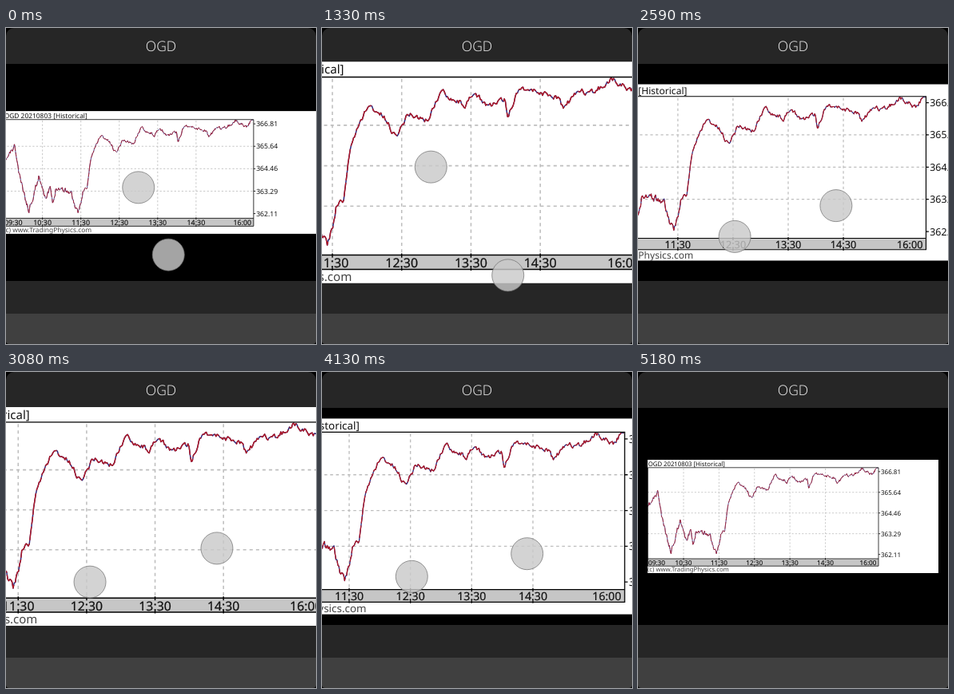
An HTML page that plays this animation: 388 by 396 pixels, repeating every 5670 ms.

```html
<!DOCTYPE html>
<html lang="en">
<head>
<meta charset="utf-8">
<title>Chart pinch zoom</title>
<style>
html, body { margin: 0; width: 100%; height: 100%; overflow: hidden; background: #000; }
svg { display: block; width: 388px; height: 396px; border-radius: 10px 10px 4px 4px; }
text { font-family: "Noto Sans", "Open Sans", sans-serif; text-rendering: geometricPrecision; white-space: pre; }
#chart text { font-size: 7.75px; fill: #111; }
#chart .hour { font-size: 8.2px; stroke: #111; stroke-width: .12; }
#chart .value { font-size: 8px; }
#chart .note { fill: #444; }
.title { font: 300 17.5px "Open Sans", Lato, sans-serif; fill: #f4f4f4; text-anchor: middle; }
.grid { stroke: #bebebe; stroke-width: .8; stroke-dasharray: 2.1 2.1; fill: none; }
.axis { stroke: #000; stroke-width: .75; fill: none; }
.price { fill: none; stroke-width: .75; stroke-linejoin: round; }
.finger { fill: rgba(202, 202, 202, .815); stroke: rgba(115, 115, 115, .75); stroke-width: 1; }
</style>
</head>
<body>
<svg viewBox="0 0 388 396">
  <rect width="388" height="396" fill="#000"/>
  <rect width="388" height="45" fill="#262626"/>
  <rect y="317" width="388" height="41" fill="#262626"/>
  <g id="chart"></g>
  <text class="title" x="194" y="29.3">OGD</text>
  <rect y="358" width="388" height="38" fill="#404040"/>
  <circle class="finger" r="20"/>
  <circle class="finger" r="20"/>
</svg>
<script>
const LOOP = 5670, STEP = 70, RELEASE = 5110;
const PLOT = { top: 9.8, bottom: 124, right: 289 };
const REACH = 42.6;  // finger distance from the pivot at zoom 1

// The pinch: time, zoom, finger angle in degrees
const pinch = [
  [0, 1.083, 66], [140, 1.083, 66], [840, 2.78, 57], [1960, .75, 51],
  [2590, 1.556, -17], [3640, 2.145, -12.3], [3710, 2.145, -12.3],
  [4270, 1.65, -11], [4340, 1.65, -11], [5060, 1, -10], [LOOP, 1, -10]
];

// Main turns of the price; noise fills in the rest
const turns = [
  [0, 61], [13, 41], [18, 74], [29, 115], [41, 75], [50, 102], [54, 88], [57, 111],
  [61, 87], [78, 94], [86, 121], [92, 92], [96.5, 90], [101, 54], [112, 28], [122, 35],
  [130, 48], [138, 33], [150, 38], [159, 19], [175, 28], [180, 21], [189, 28],
  [200, 25], [201.4, 36], [209, 16], [220, 19], [234, 23], [237, 30], [249, 17],
  [254, 22], [268, 11], [281, 18], [286, 11], [PLOT.right, 11]
];

let seed = 11;
function random() {
  seed = (seed * 16807) % 2147483647;
  return seed / 2147483647;
}

function pricePath() {
  const points = [];
  let i = 0, drift = 0;
  for (let x = 0; x <= PLOT.right; x += .7) {
    while (i < turns.length - 2 && x > turns[i + 1][0]) i++;
    const [xa, ya] = turns[i], [xb, yb] = turns[i + 1];
    const rough = x < 96 ? 6 : 3.2;
    drift = drift * .6 + (random() - .5) * rough;
    const y = ya + (yb - ya) * (x - xa) / (xb - xa) + drift;
    points.push(x.toFixed(1) + " " + Math.min(123, Math.max(10.4, y)).toFixed(1));
  }
  return "M" + points.join("L");
}

function label(kind, x, y, str, anchor = "start") {
  return `<text class="${kind}" x="${x}" y="${y}" text-anchor="${anchor}">${str}</text>`;
}

function chartMarkup() {
  const { top, bottom, right } = PLOT;
  const line = pricePath();
  const hourY = 131.9;
  let grid = "", ticks = "";
  let labels = label("hour", 1, hourY, "09:30") + label("hour", 286.5, hourY, "16:00", "end");

  for (let i = 0; i < 5; i++) {
    const x = 45 + i * 44.38;
    grid += `M${x} 11V${bottom}`;
    ticks += `M${x} 123V125.6M${x} 132V134`;
    labels += label("hour", x, hourY, 10 + i + ":30", "middle");

    const y = 14.8 + i * 25.95;
    if (i % 4) grid += `M0 ${y}H${right}`;
    ticks += `M${right} ${y}h2.2`;
    labels += label("value", 292, y + 2.9, (366.81 - i * 1.1745).toFixed(2));
  }

  return `<rect width="364" height="142" fill="#fff"/>
    <path class="grid" d="${grid}"/>
    <path class="price" d="${line}" stroke="#2c2478"/>
    <path class="price" d="${line}" stroke="#b01826" stroke-dasharray="9 1.6 5 1.2 14 2"/>
    <rect y="${bottom}" width="${right}" height="9.2" fill="#c6c6c6"/>
    <path class="axis" d="M.4 ${top}V133.2H${right}V${top}ZM0 ${bottom}H${right}${ticks}"/>
    ${labels}
    ${label("name", .7, 7.8, "OGD 20210803 [Historical]")}
    ${label("note", 0, 140.4, "(c) www.TradingPhysics.com")}`;
}

// Monotone cubic, so holds stay still and peaks do not overshoot
function sample(t, col) {
  let i = 0;
  while (i < pinch.length - 2 && t >= pinch[i + 1][0]) i++;
  const slope = j => pinch[j] && pinch[j + 1]
    ? (pinch[j + 1][col] - pinch[j][col]) / (pinch[j + 1][0] - pinch[j][0]) : 0;
  const tangent = j => {
    const a = slope(j - 1), b = slope(j);
    return a * b > 0 ? 2 * a * b / (a + b) : 0;
  };
  const span = pinch[i + 1][0] - pinch[i][0];
  const u = (t - pinch[i][0]) / span, v = 1 - u;
  return pinch[i][col] * v * v * (1 + 2 * u) + pinch[i + 1][col] * u * u * (3 - 2 * u)
    + span * u * v * (tangent(i) * v - tangent(i + 1) * u);
}

const chart = document.getElementById("chart");
const fingers = document.querySelectorAll(".finger");
chart.innerHTML = chartMarkup();

function draw(time) {
  const t = Math.floor((time % LOOP) / STEP) * STEP;
  const zoom = sample(t, 1), angle = sample(t, 2) * Math.PI / 180;
  chart.setAttribute("transform", `translate(194 181) scale(${zoom}) translate(-182 -71)`);
  fingers.forEach((finger, i) => {
    const reach = (i ? 1 : -1) * REACH * zoom;
    finger.setAttribute("cx", 184.5 + reach * Math.cos(angle));
    finger.setAttribute("cy", 242 + reach * Math.sin(angle));
    finger.setAttribute("visibility", t > RELEASE ? "hidden" : "visible");
  });
}

let start = null;
function tick(now) {
  if (start === null) start = now;
  draw(Math.max(0, now - start));
  requestAnimationFrame(tick);
}
draw(0);
requestAnimationFrame(tick);
</script>
</body>
</html>
```
